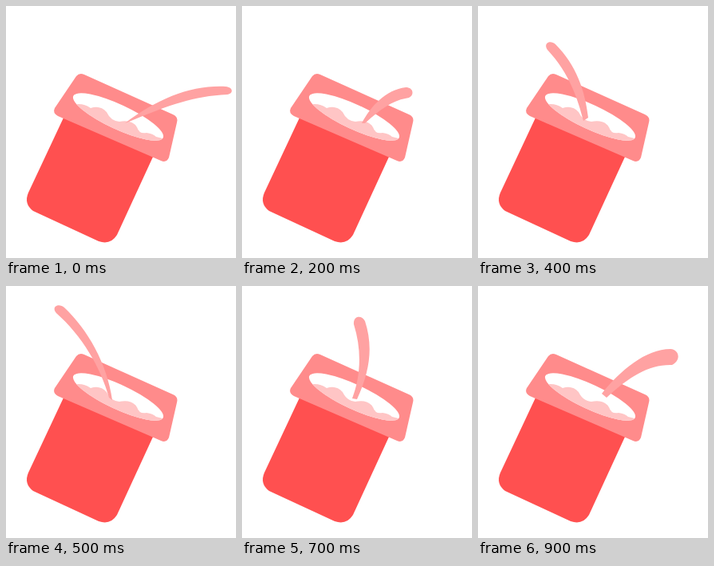
Write an HTML page without scripts that moves like this. It is 288 by 316 pixels and loops after 1 s.

```html
<!DOCTYPE html>
<html lang="en">
<head>
<meta charset="utf-8">
<title>Yogurt cup</title>
<style>
  html, body { margin: 0; width: 100%; height: 100%; overflow: hidden; background: #fff; }
  svg { display: block; width: 100%; height: 100%; }
  .cup { fill: #ff5050; }
  .lid { fill: #ff8b8b; }
  .yogurt { fill: #ffc5c5; }
  .spoon { fill: #ffa2a2; animation: stir 1s step-end infinite; }

  /* Each pose: tip, near edge, rounded handle end, far edge back to the tip */
  @keyframes stir {
    0%, 100% { d: path("M149 147C190 116 232 99 275 101C285 102 285 110 277 111C235 113 205 124 159 143Z"); }
    10% { d: path("M150 149C176 122 208 107 246 105C256 106 257 115 248 117C216 118 188 128 158 147Z"); }
    20% { d: path("M150 147C161 126 180 105 205 102C215 102 216 112 209 115C190 118 176 127 154 147Z"); }
    30% { d: path("M136 148C131 132 137 108 115 76C111 68 121 66 126 71C143 92 148 115 142 135Z"); }
    40% { d: path("M132 144C125 117 115 85 87 55C81 46 91 42 97 48C123 74 134 106 138 140Z"); }
    50% { d: path("M129 140C119 103 95 62 63 34C56 26 66 21 73 27C102 54 127 98 133 143Z"); }
    60% { d: path("M133 141C133 108 120 70 98 40C94 30 105 27 111 34C133 66 144 108 139 142Z"); }
    70% { d: path("M138 141C149 112 150 80 140 48C139 37 150 36 154 44C164 75 161 105 144 142Z"); }
    80% { d: path("M146 144C154 110 176 68 203 63C214 62 214 74 208 78C182 95 172 112 152 145Z"); }
    90% { d: path("M155 135C178 106 210 79 241 79C253 80 254 94 243 99C215 98 190 113 161 140Z"); }
  }
</style>
</head>
<body>
<svg viewBox="0 0 288 316">
  <defs>
    <ellipse id="hole" cx="140.5" cy="139" rx="62" ry="15.5" transform="rotate(25 140.5 139)"/>
    <clipPath id="inside"><use href="#hole"/></clipPath>
  </defs>
  <path class="cup" d="M73 138L28 234Q22 248 34 257L116 295Q131 300 139 287L185 187Z"/>
  <path class="lid" d="M88 88Q92 83 98 86L209 136Q216 139 214 146L204 190Q201 197 194 194L65 138Q58 134 61 128Z"/>
  <use href="#hole" fill="#fff"/>
  <path class="yogurt" clip-path="url(#inside)"
    d="M84 124Q96 121 106 128Q118 124 126 133Q131 144 142 145Q158 142 164 152Q167 161 176 159Q184 160 188 164L200 167V180H84Z"/>
  <path class="spoon" d="M149 147C190 116 232 99 275 101C285 102 285 110 277 111C235 113 205 124 159 143Z"/>
</svg>
</body>
</html>
```
